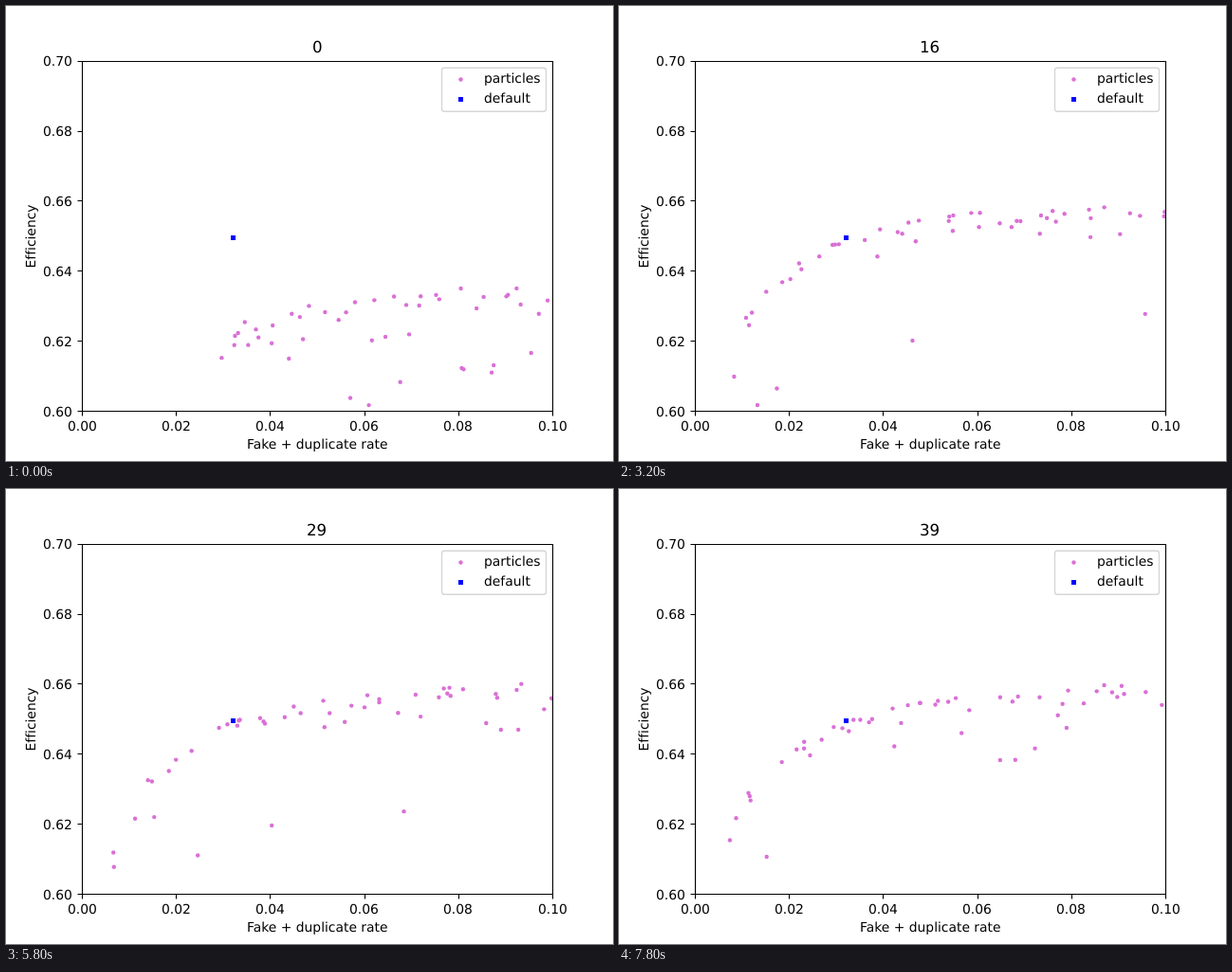
Write an HTML page that moves like this. It is 640 by 480 pixels and loops after 8000 ms.

```html
<!DOCTYPE html>
<html lang="en">
<head>
<meta charset="utf-8">
<title>Particle swarm</title>
<style>
  html, body { margin: 0; width: 100%; height: 100%; overflow: hidden; background: #fff; }
  svg { display: block; width: 640px; height: 480px; }
  text {
    font: 13.889px "DejaVu Sans", sans-serif;
    font-variant-ligatures: none;
    text-rendering: geometricPrecision;
  }
  #title { font-size: 16.667px; }
  #axes { fill: none; stroke: #000; stroke-width: 1.11; }
  .particle { fill: #da70d6; }
  .default { fill: #00f; }
</style>
</head>
<body>
<svg viewBox="0 0 640 480">
  <clipPath id="plot"><rect x="80" y="57.6" width="496" height="369.6"/></clipPath>
  <g id="swarm" class="particle" clip-path="url(#plot)"></g>
  <rect class="default" x="237" y="242" width="5" height="5"/>
  <path id="axes"/>
  <g id="labels"></g>
  <text id="title" y="49"></text>
  <text text-anchor="middle" transform="translate(31 243) rotate(-90)">Efficiency</text>
  <rect x="459.5" y="65.2" width="110" height="46" rx="2.8"
        fill="#fff" fill-opacity=".8" stroke="#ccc" stroke-opacity=".8" stroke-width="1.39"/>
  <circle class="particle" cx="479.5" cy="77.5" r="2.2"/>
  <rect class="default" x="477" y="96" width="5" height="5"/>
  <text x="504" y="81">particles</text>
  <text x="504" y="102">default</text>
</svg>
<script>
const STEP_MS = 200, STEPS = 40, COUNT = 52;
const LEFT = 80, WIDTH = 496, BOTTOM = 427.2, MIDDLE = 328;
const $ = id => document.getElementById(id);

function seeded(seed) {
  return () => {
    seed = seed + 0x6D2B79F5 | 0;
    let t = Math.imul(seed ^ seed >>> 15, 1 | seed);
    t = t + Math.imul(t ^ t >>> 7, 61 | t) ^ t;
    return ((t ^ t >>> 14) >>> 0) / 4294967296;
  };
}

// Best trade-off curve that the swarm settles under; u runs 0 to 1 across the plot.
const frontY = u =>
  203 + 20 * (1 - u) + 175 * Math.exp(-u / 0.18) + 600 * Math.exp(-u / 0.025);

function swarm(step) {
  const random = seeded(step * 7919 + 1);
  const unsettled = Math.exp(-step / 3);
  const minU = 0.055 + 0.23 * Math.exp(-step / 2);
  return Array.from({ length: COUNT }, (_, i) => {
    const u = minU + (1 - minU) * Math.abs(i + 3 * random() - 1) / COUNT;
    const near = random() < 0.66 * (1 - unsettled);
    const depth = near ? 18 * random() ** 2 : 4 - 42 * Math.log(1 - random());
    return [LEFT + WIDTH * u, frontY(u) + 85 * unsettled + depth];
  });
}

// Text starts on whole pixels; align is 0.5 for centred, 1 for right-aligned.
function place(text, x, align) {
  text.setAttribute("x", Math.round(x - align * text.getComputedTextLength()));
}

function addLabel(content, x, y, align) {
  const text = document.createElementNS("http://www.w3.org/2000/svg", "text");
  text.textContent = content;
  text.setAttribute("y", y);
  $("labels").append(text);
  place(text, x, align);
}

function drawAxes() {
  let path = "M80.5 58.5H576.5V427.5H80.5Z";
  for (let i = 0; i <= 5; i++) {
    const x = LEFT + 99.2 * i, y = BOTTOM - 73.92 * i;
    path += `M${Math.round(x) + 0.5} 427.5v5M80.5 ${Math.round(y) + 0.5}h-5`;
    addLabel((i * 0.02).toFixed(2), x, 448, 0.5);
    addLabel((0.6 + i * 0.02).toFixed(2), 70.3, Math.round(y + 5.5), 1);
  }
  $("axes").setAttribute("d", path);
  addLabel("Fake + duplicate rate", MIDDLE, 467, 0.5);
}

let shown = -1;
function frame() {
  const step = Math.floor(performance.now() / STEP_MS) % STEPS;
  if (step !== shown) {
    shown = step;
    $("title").textContent = step;
    place($("title"), MIDDLE, 0.5);
    $("swarm").innerHTML = swarm(step)
      .map(([x, y]) => `<circle cx="${x}" cy="${y}" r="2.2"/>`).join("");
  }
  requestAnimationFrame(frame);
}

drawAxes();
frame();
</script>
</body>
</html>
```
